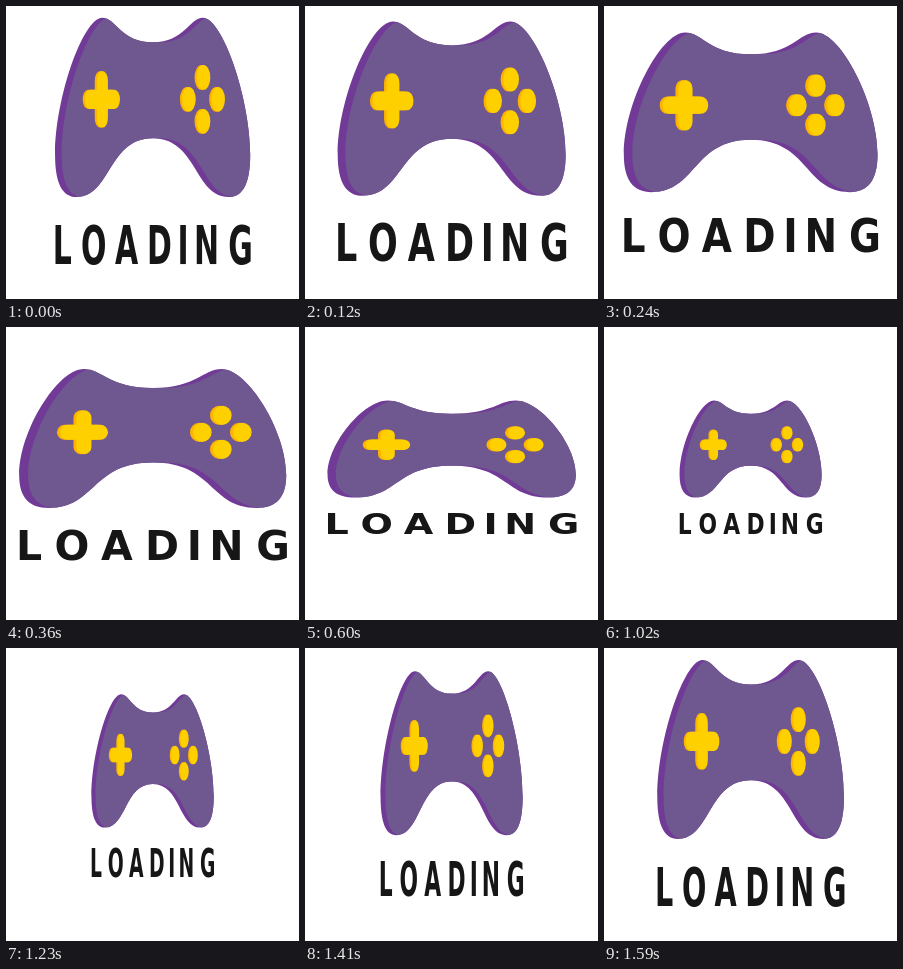
Recreate the animation shown at these times as an HTML page without scripts. Size 293x293 px, loop 1.62 s.

```html
<!DOCTYPE html>
<html lang="en">
<head>
<meta charset="utf-8">
<title>Loading</title>
<style>
  @property --phase {
    syntax: "<angle>";
    inherits: false;
    initial-value: 0deg;
  }

  html, body {
    margin: 0;
    width: 100%;
    height: 100%;
    overflow: hidden;
    background: #fff;
  }

  svg {
    display: block;
    width: 100%;
    height: 100%;
  }

  /* Width follows a sine and height a cosine, a quarter turn apart. */
  .wobble {
    transform-origin: 146.5px 146.5px;
    transform: scale(
      calc(.731 + .2734 * sin(var(--phase))),
      calc(.939 + .351 * cos(var(--phase)))
    );
    animation: turn 1620ms steps(54) -2ms infinite;
  }

  @keyframes turn {
    to { --phase: 360deg; }
  }

  .edge { fill: #703a96; }
  .face { fill: #6f578f; }
  .gold { fill: #ffb300; }
  .yellow { fill: #ffd000; }

  text {
    font: 700 41px "DejaVu Sans", sans-serif;
    text-anchor: middle;
    fill: #161616;
  }
</style>
</head>
<body>
<svg viewBox="0 0 293 293">
  <defs>
    <path id="body" d="M0 61
      C-44 61 -50 42 -69 42
      C-95 42 -133.5 104 -133.5 148
      C-133.5 170 -124 181 -104 181
      C-57 181 -61 135.5 0 135.5
      C61 135.5 57 181 104 181
      C124 181 133.5 170 133.5 148
      C133.5 104 95 42 69 42
      C50 42 44 61 0 61Z"/>
    <clipPath id="outline"><use href="#body" x="146.7"/></clipPath>
    <g id="pad">
      <rect x="-24" y="-7.5" width="48" height="15" rx="7.5"/>
      <rect x="-7.5" y="-22" width="15" height="44" rx="7.5"/>
    </g>
    <ellipse id="button" rx="9.3" ry="9.6"/>
    <g id="buttons">
      <use href="#button" x="-20"/>
      <use href="#button" x="20"/>
      <use href="#button" y="-17"/>
      <use href="#button" y="17"/>
    </g>
  </defs>

  <g class="wobble">
    <use href="#body" x="146.7" class="edge"/>
    <g clip-path="url(#outline)">
      <use href="#body" x="155.7" class="face"/>
    </g>

    <use href="#pad" x="75" y="105.3" class="gold"/>
    <use href="#pad" x="78" y="105.3" class="yellow"/>

    <use href="#buttons" x="213.3" y="105.3" class="gold"/>
    <use href="#buttons" x="216.3" y="105.3" class="yellow"/>

    <text x="23 66 111 156 188.5 220.5 267" y="232.8">LOADING</text>
  </g>
</svg>
</body>
</html>
```
